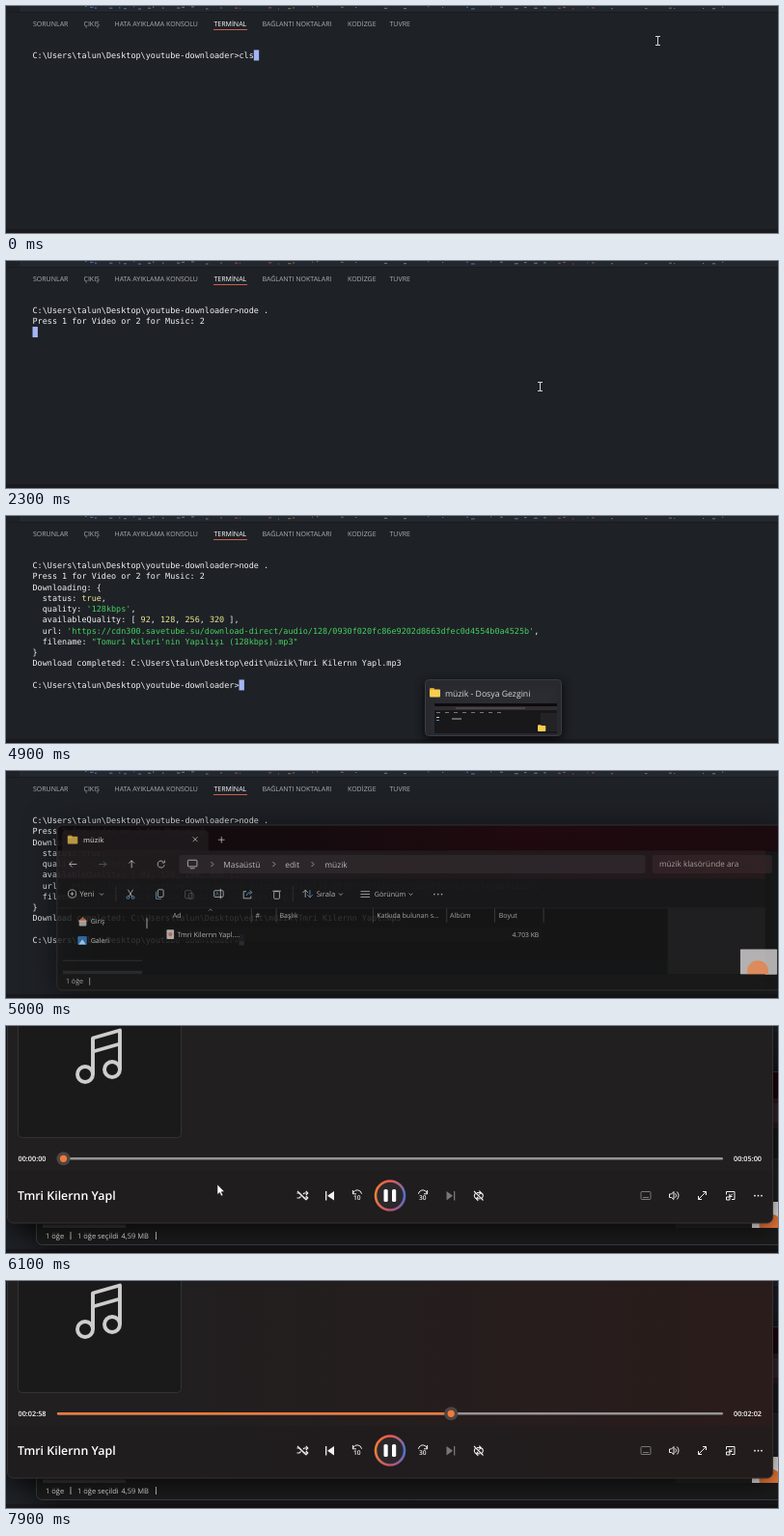
These frames come from a looping animation (800x235 px, 8 s). An HTML page with a canvas:

```html
<!DOCTYPE html>
<html lang="tr">
<head>
<meta charset="utf-8">
<title>Terminal</title>
<style>
html, body { margin: 0; width: 100%; height: 100%; overflow: hidden; background: #1e2126; }
canvas { display: block; width: 800px; height: 235px; }
</style>
</head>
<body>
<canvas id="stage" width="800" height="235"></canvas>
<script>
const ctx = document.getElementById('stage').getContext('2d');
const LOOP = 8000, STEP = 100;
const SANS = '"Open Sans", "Noto Sans", sans-serif';
const MONO = '"DejaVu Sans Mono", "Liberation Mono", monospace';
const COL = 5.095, ROW = 11.27, LEFT = 27.5;
const WHITE = '#f2f2f2', GREEN = '#45d060', YELLOW = '#f0e890', ORANGE = '#f07a3a';
const PROMPT = 'C:\\Users\\talun\\Desktop\\youtube-downloader>';
const SONG = 'Tmri Kilernn Yapl';

function box(x, y, w, h, fill, r = 0, stroke) {
  ctx.beginPath();
  ctx.roundRect(x, y, w, h, r);
  if (fill) { ctx.fillStyle = fill; ctx.fill(); }
  if (stroke) { ctx.strokeStyle = stroke; ctx.lineWidth = 1; ctx.stroke(); }
}

function line(color, w, ...p) {
  ctx.beginPath();
  for (let i = 0; i < p.length; i += 2) ctx.lineTo(p[i], p[i + 1]);
  ctx.strokeStyle = color;
  ctx.lineWidth = w;
  ctx.stroke();
}

function disc(x, y, r, fill, stroke, w = 1) {
  ctx.beginPath();
  ctx.arc(x, y, r, 0, 7);
  if (fill) { ctx.fillStyle = fill; ctx.fill(); }
  if (stroke) { ctx.strokeStyle = stroke; ctx.lineWidth = w; ctx.stroke(); }
}

function arc(x, y, r, a, b, color, w = 1) {
  ctx.beginPath();
  ctx.arc(x, y, r, a, b);
  ctx.strokeStyle = color;
  ctx.lineWidth = w;
  ctx.stroke();
}

function poly(fill, ...p) {
  ctx.beginPath();
  for (let i = 0; i < p.length; i += 2) ctx.lineTo(p[i], p[i + 1]);
  ctx.closePath();
  ctx.fillStyle = fill;
  ctx.fill();
}

// y is the middle of the capitals
function label(s, x, y, size, color = WHITE, weight = 500) {
  ctx.font = `${weight} ${size}px ${SANS}`;
  ctx.fillStyle = color;
  ctx.fillText(s, x, y + size * 0.36);
}

function fade(x0, x1, ...stops) {
  const g = ctx.createLinearGradient(x0, 0, x1, 0);
  stops.forEach((c, i) => g.addColorStop(i / (stops.length - 1), c));
  return g;
}

function shadowed(blur, draw) {
  ctx.shadowColor = 'rgba(0,0,0,.75)';
  ctx.shadowBlur = blur;
  ctx.shadowOffsetY = 3;
  draw();
  ctx.shadowColor = 'transparent';
  ctx.shadowBlur = ctx.shadowOffsetY = 0;
}

function random(seed) {
  return () => (seed = (seed * 16807) % 2147483647) / 2147483647;
}

// ---- editor panel ----
function panel() {
  box(0, 0, 800, 235, '#1e2126');
  box(14, 0, 786, 6, '#23272e');
  box(0, 6, 800, 1, '#191b20');
  const rnd = random(77), tints = ['#6b727e', '#4a6fa3', '#6b727e', '#85504c', '#7b664c'];
  for (let x = 82; x < 752; x += 5) {
    const tint = tints[Math.floor(x / 70) % 5], y = rnd() * 2.5;
    if (rnd() < 0.4) box(x, y, 1 + rnd() * 3, 1.1, tint);
  }
  box(0, 231, 800, 4, '#1a191d');
  const tabs = [['SORUNLAR', 28], ['ÇIKIŞ', 80.5], ['HATA AYIKLAMA KONSOLU', 112.5], ['TERMİNAL', 215.5],
    ['BAĞLANTI NOKTALARI', 265.5], ['KODİZGE', 354], ['TUVRE', 397.5]];
  tabs.forEach(([s, x], i) => label(s, x, 18.8, 7, i === 3 ? '#fff' : '#acaeb2'));
  box(215, 24, 35, 1, '#c8604f');
}

function put(row, ...parts) {
  ctx.font = `8.46px ${MONO}`;
  let col = 0;
  for (let i = 0; i < parts.length; i += 2) {
    ctx.fillStyle = parts[i + 1] || WHITE;
    for (const ch of parts[i]) ctx.fillText(ch, LEFT + COL * col++, 54 + ROW * row);
  }
  return col;
}

function caret(row, col) {
  box(LEFT + COL * col, 45.5 + ROW * row, 5.4, 11, '#a3b5f3');
}

function terminal(t) {
  const typed = t < 100 ? 'cls' : t < 200 ? '' : 'node .';
  const end = put(0, PROMPT + typed);
  if (t < 400) return caret(0, end);
  if (t < 600) return caret(1, 0);
  const ask = put(1, 'Press 1 for Video or 2 for Music: ' + (t < 1000 ? '' : '2'));
  if (t < 1100) return caret(1, ask);
  if (t < 2500) return caret(2, 0);
  put(2, 'Downloading: {');
  put(3, '  status: ', WHITE, 'true', YELLOW, ',', WHITE);
  put(4, '  quality: ', WHITE, "'128kbps'", GREEN, ',', WHITE);
  put(5, '  availableQuality: [ ', WHITE, '92', YELLOW, ', ', WHITE, '128', YELLOW, ', ', WHITE,
    '256', YELLOW, ', ', WHITE, '320', YELLOW, ' ],', WHITE);
  put(6, '  url: ', WHITE,
    "'https://cdn300.savetube.su/download-direct/audio/128/0930f020fc86e9202d8663dfec0d4554b0a4525b'", GREEN, ',', WHITE);
  put(7, '  filename: ', WHITE, '"Tomuri Kileri\'nin Yapılışı (128kbps).mp3"', GREEN);
  put(8, '}');
  if (t < 4200) return caret(9, 0);
  put(9, `Download completed: C:\\Users\\talun\\Desktop\\edit\\müzik\\${SONG}.mp3`);
  caret(11, put(11, PROMPT));
}

// ---- file explorer ----
function folder(x, y, s = 1) {
  box(x, y, 5 * s, 3 * s, '#d99a20', s);
  box(x, y + 1.4 * s, 11 * s, 8 * s, '#f8cd52', s);
}

function preview() {
  shadowed(10, () => box(434.5, 169.5, 141, 58, '#2b2c31', 4, '#3b3c42'));
  folder(439, 178);
  label('müzik - Dosya Gezgini', 455, 183.5, 8.7, '#d8d8d8', 400);
  box(444, 194, 127, 31, '#18181a');
  box(444, 194, 127, 3, '#0e0b0d');
  box(444, 197, 127, 4, '#302d31');
  box(466, 198, 72, 2, '#49464a');
  for (let i = 0; i < 8; i++) box(446 + i * 9, 203, 4, 1, '#77777a');
  box(446, 208, 3, 1, '#c4c4c4');
  box(446, 211, 3, 1, '#4d93d8');
  box(462, 209.5, 10, 1, '#b5b5b5');
  box(554, 204, 17, 19, '#232325');
  folder(551, 216, 0.75);
}

function chevron(x, y, right, color = '#cdcdcd') {
  if (right) line(color, 1, x - 1.3, y - 2.6, x + 1.3, y, x - 1.3, y + 2.6);
  else line(color, 1, x - 2, y - 1, x, y + 1, x + 2, y - 1);
}

function arrow(x, y, turn, color) {
  ctx.save();
  ctx.translate(x, y);
  ctx.rotate(turn);
  line(color, 1, 4, 0, -4, 0);
  line(color, 1, -1, -3, -4, 0, -1, 3);
  ctx.restore();
}

function toolbar() {
  const ink = '#d8d8d8', blue = '#6cb2e6', dim = '#5c5a5c';
  disc(48, 122, 4.3, null, ink);
  line(ink, 1, 46, 122, 50, 122);
  line(ink, 1, 48, 120, 48, 124);
  label('Yeni', 56, 122.5, 8.3);
  chevron(80, 122.5);
  box(95, 114, 1, 17, '#3a383a');
  line(ink, 1, 108.5, 117.5, 113, 125);
  line(ink, 1, 114, 117.5, 109.5, 125);
  disc(108.6, 126, 1.5, null, blue);
  disc(114, 126, 1.5, null, blue);
  box(141, 117.5, 6, 8, null, 1, ink);
  line(blue, 1, 139, 119.5, 139, 127.5, 145, 127.5);
  box(170.5, 118.5, 7, 8.5, null, 1, dim);
  box(174.5, 121.5, 5, 6, null, 1, dim);
  box(202, 118.5, 10, 7, null, 1, ink);
  label('A', 203.5, 122, 6, blue);
  line(ink, 1, 209, 116.5, 209, 127.5);
  line(ink, 1, 237, 119.5, 234, 119.5, 234, 127, 242, 127, 242, 124.5);
  line(blue, 1, 237, 124, 239, 121, 243, 120.5);
  line(blue, 1, 240.5, 118, 243, 120.5, 240.5, 123);
  line(ink, 1, 265.5, 119, 274.5, 119);
  box(267, 119.5, 6, 8, null, 1, ink);
  box(287, 114, 1, 17, '#3a383a');
  arrow(301, 122, Math.PI / 2, ink);
  arrow(306, 122, -Math.PI / 2, blue);
  label('Sırala', 313, 122.5, 8);
  chevron(339.5, 122.5);
  for (const y of [119.5, 122.5, 125.5]) line(ink, 1, 361, y, 371, y);
  label('Görünüm', 376, 122.5, 7.5);
  chevron(415.5, 122.5);
  for (const x of [441, 445, 449]) disc(x, 122.5, 0.9, ink);
}

function explorer(selected) {
  shadowed(34, () => box(31.5, 47.5, 790, 179, '#191919', 6));
  box(32, 48, 790, 28, fade(32, 800, '#0e0709', '#13060a', '#23040b', '#1c040a'), [6, 6, 0, 0]);
  box(37, 53, 159, 24, '#231e21', [5, 5, 0, 0]);
  box(32, 75, 768, 31, fade(32, 800, '#231e21', '#241c1f', '#2c1b1f'));
  box(32, 106, 768, 31, '#1a191a');
  folder(43, 58.5);
  label('müzik', 60, 63.5, 7.7, WHITE, 600);
  line('#d8d8d8', 1, 179, 60.5, 184, 65.5);
  line('#d8d8d8', 1, 184, 60.5, 179, 65.5);
  line('#d8d8d8', 1, 206.5, 63.5, 213.5, 63.5);
  line('#d8d8d8', 1, 210, 60, 210, 67);
  arrow(49, 90, 0, '#e4e4e4');
  arrow(81, 90, Math.PI, '#6c686a');
  arrow(112.5, 90, Math.PI / 2, '#e4e4e4');
  arc(144.5, 90, 3.6, 0.2, 5.4, '#e4e4e4');
  line('#e4e4e4', 1, 148.3, 85.8, 148.3, 88.4, 145.6, 88.4);
  box(164, 80, 506, 20, '#322c2f', 3);
  box(677.5, 80, 130, 20, '#35262a', 3);
  box(173.5, 85.5, 10, 7, null, 1, '#e4e4e4');
  line('#e4e4e4', 1, 176, 94.5, 181, 94.5);
  chevron(200, 90, true);
  label('Masaüstü', 212, 90, 8.8);
  chevron(267, 90, true);
  label('edit', 279, 90, 8.8);
  chevron(309, 90, true);
  label('müzik', 322, 90, 8.8);
  label('müzik klasöründe ara', 685, 90, 8.6, '#d6d0d2', 400);
  toolbar();

  box(32, 137, 768, 1, '#2e2d2e');
  poly('#e8794a', 54, 152, 59.5, 147, 65, 152);
  box(55.5, 151, 8, 6, '#d9d4d0', 1);
  label('Giriş', 68, 152.2, 7.3);
  box(54, 168, 10, 9.5, '#3b86d6', 1.5);
  poly('#cfe6fa', 55, 177, 59, 171.5, 63, 177);
  label('Galeri', 68, 173.2, 7.3);
  box(38, 194, 86, 1, '#3a3a3a');
  box(38, 205.5, 86, 3.5, '#333');
  box(128.3, 148, 1.6, 12, '#9a9a9a', 1);

  const heads = [['Ad', 157], ['#', 247], ['Başlık', 273], ['Katkıda bulunan s...', 378.5], ['Albüm', 458], ['Boyut', 511]];
  heads.forEach(([s, x]) => label(s, x, 145.7, 7.4, '#e0e0e0'));
  for (const x of [242, 269, 374, 454, 506, 559]) box(x, 138, 1, 15, '#4a4a4a');
  line('#999', 1, 196, 140.5, 198, 138.5, 200, 140.5);
  box(147.5, 158.5, 410.5, 15, selected ? '#4c4d50' : '#191919', 1, selected ? '#b4b6b9' : null);
  box(150.5, 161, 8, 10, '#eee8e2', 1);
  disc(154.5, 166, 2.2, '#a8583c');
  label('Tmri Kilernn Yapl....', 162, 166, 7.6);
  label('4.703 KB', 525.5, 166, 7.1);

  box(694, 138, 106, 71, '#242324');
  box(773, 182, 40, 27.5, '#f2f0ee', 1);
  ctx.save();
  ctx.beginPath();
  ctx.rect(773, 182, 40, 27.5);
  ctx.clip();
  disc(792, 206, 11.5, ORANGE);
  ctx.restore();
  box(32, 209, 768, 17, '#1b1a1b', [0, 0, 0, 6]);
  label('1 öğe', 41, 217, 7.5, '#e0e0e0');
  box(66.5, 213, 1, 8, '#bbb');
  if (selected) {
    label('1 öğe seçildi', 74, 217, 7.5, '#e0e0e0');
    label('4,59 MB', 119.5, 217, 7.5, '#e0e0e0');
    box(155, 213, 1, 8, '#bbb');
  }
  box(31.5, 47.5, 790, 179, null, 6, '#3d3a3c');
}

// ---- media player ----
function note() {
  const ink = '#cdcdcd';
  disc(82, 50, 8, null, ink, 3.9);
  disc(110, 45, 8, null, ink, 3.9);
  ctx.lineJoin = 'round';
  line(ink, 3.9, 90, 50, 90, 12.5, 118, 4.5, 118, 45);
  line(ink, 3.6, 90, 26.5, 118, 18.5);
  ctx.lineJoin = 'miter';
}

function skip(x, dir, text, ink) {
  arc(x, 174.5, 4.6, Math.PI * 1.05, Math.PI * 1.95, ink);
  const e = x + dir * 4.6;
  line(ink, 1, e, 170, e, 173.8, e - dir * 3.6, 173.8);
  label(text, x - 4, 178, 6.6, ink, 600);
}

function controls() {
  const ink = '#f0f0f0', dim = '#777';
  line(ink, 1.1, 301.5, 173, 304, 173, 309, 178, 312.5, 178);
  line(ink, 1.1, 301.5, 178, 304, 178, 305.5, 176.5);
  line(ink, 1.1, 308, 174, 309, 173, 312.5, 173);
  line(ink, 1.1, 310.8, 171, 312.8, 173, 310.8, 175);
  line(ink, 1.1, 310.8, 176, 312.8, 178, 310.8, 180);
  line(ink, 1.1, 302, 171, 311, 180);
  box(331, 171, 1.3, 9.5, ink);
  poly(ink, 340, 171, 340, 180.5, 333, 175.7);
  skip(364, -1, '10', ink);
  skip(432, 1, '30', ink);
  poly(dim, 456.5, 171, 456.5, 180.5, 463, 175.7);
  box(464, 171, 1.3, 9.5, dim);
  arc(488.3, 175.7, 3, 1.6, 4.1, ink, 1.1);
  arc(491.3, 175.7, 3, -1.6, 1, ink, 1.1);
  line(ink, 1.1, 488, 172.6, 492, 172.6);
  line(ink, 1.1, 487.5, 178.8, 491.5, 178.8);
  line(ink, 1.1, 490.3, 170.6, 492.3, 172.6, 490.3, 174.6);
  line(ink, 1.1, 489.3, 176.8, 487.3, 178.8, 489.3, 180.8);
  line(ink, 1.1, 485, 171, 494.5, 180.5);

  const ring = ctx.createConicGradient(Math.PI, 398, 175.5);
  ['#f08232', '#ee5a4a', '#4a72d8', '#c0506e', '#f08232'].forEach((c, i) => ring.addColorStop(i / 4, c));
  disc(398, 175.5, 15, '#2b282b', ring, 2.6);
  box(391.5, 169, 4.2, 13, '#fff', 1.6);
  box(400, 169, 4.2, 13, '#fff', 1.6);

  box(658, 171.5, 10, 8, null, 1, dim);
  line(dim, 1, 660, 177.5, 666, 177.5);
  line(ink, 1, 687.5, 174, 689.5, 174, 692, 171.5, 692, 179.5, 689.5, 177.5, 687.5, 177.5, 687.5, 174);
  arc(691.5, 175.5, 3, -0.8, 0.8, ink);
  arc(691.5, 175.5, 5.5, -0.8, 0.8, ink);
  line(ink, 1, 717.5, 179.5, 725.5, 171.5);
  line(ink, 1, 722, 171.5, 725.5, 171.5, 725.5, 175);
  line(ink, 1, 717.5, 176, 717.5, 179.5, 721, 179.5);
  line(ink, 1, 746.5, 174.5, 746.5, 171.5, 755, 171.5, 755, 179.5, 752, 179.5);
  box(746.5, 177, 3.5, 3, null, 0, ink);
  line(ink, 1, 753, 173.5, 749.5, 177);
  line(ink, 1, 749.8, 173.8, 749.8, 176.5, 752.6, 176.5);
  for (const x of [776, 779.5, 783]) disc(x, 175.7, 0.9, ink);
}

function clock(s) {
  return '00:' + [Math.floor(s / 60), s % 60].map(n => String(n).padStart(2, '0')).join(':');
}

function player(t) {
  shadowed(24, () => box(1.5, -30, 793, 234, '#211f20', 6));
  const warm = Math.min(1, Math.max(0, (t - 6900) / 800));
  if (warm) box(1.5, -30, 793, 234, fade(150, 795, 'rgba(42,28,26,0)', `rgba(42,28,26,${warm})`), 6);
  box(1.5, 150, 793, 54, 'rgba(30,28,30,.55)', [0, 0, 6, 6]);
  box(1.5, -30, 793, 234, null, 6, '#343233');
  box(12.5, -20, 169, 135.5, '#1b1a1b', 4, '#343233');
  note();

  const total = 300, at = t < 7200 ? 0 : t < 7800 ? 177 : 178;
  const x = 59.5 + 677 * at / total;
  box(53, 136, 690, 2.6, '#989496', 1.3);
  if (at) box(53, 136, x - 53, 2.6, ORANGE, 1.3);
  disc(x, 137.3, 7, '#4d4543');
  disc(x, 137.3, 3.6, ORANGE);
  if (t >= 5900) {
    label(clock(at), 12.5, 137.8, 7.3, '#fff', 600);
    label(clock(total - at), 754, 137.8, 7.3, '#fff', 600);
    label(SONG, 12, 175.5, 12.4, '#fff', 600);
  }
  controls();
}

// ---- pointer ----
const path = [[0, 675, 36], [1200, 675, 36], [1500, 558, 130], [1600, 558, 130], [1700, 553, 130], [2400, 553, 130],
  [2800, 506, 245], [3800, 506, 245], [3900, 506, 233], [4000, 506, 245], [5000, 505, 240], [5300, 219, 164],
  [6300, 219, 164], [6800, 265, 149.5], [7200, 461, 137], [7400, 461, 137], [7700, 810, 150], [8000, 810, 150]];

function pointer(t) {
  const i = path.findIndex(p => p[0] > t), [t0, x0, y0] = path[i - 1], [t1, x1, y1] = path[i];
  const k = (t - t0) / (t1 - t0), x = x0 + (x1 - x0) * k, y = y0 + (y1 - y0) * k;
  if (t < 5000) {
    const ink = '#d2d4d6';
    line(ink, 1, x + 0.5, y - 4.5, x + 0.5, y + 4.5);
    line(ink, 1, x - 2, y - 4.5, x + 3, y - 4.5);
    line(ink, 1, x - 2, y + 4.5, x + 3, y + 4.5);
  } else {
    const p = [0, 0, 0, 10.5, 2.4, 8.4, 4, 12, 5.8, 11.2, 4.2, 7.7, 7.4, 7.4].map((v, n) => v + (n % 2 ? y : x));
    poly('#fff', ...p);
    line('#222', 0.6, ...p, p[0], p[1]);
  }
}

function draw(t) {
  panel();
  terminal(t);
  if (t >= 4500 && t < 5000) preview();
  if (t >= 5000) {
    const k = Math.min(1, 0.7 + (t - 5000) / 300);
    ctx.save();
    ctx.globalAlpha = k;
    ctx.translate(505 * (1 - k) * 0.15, 235 * (1 - k) * 0.15);
    ctx.scale(0.85 + k * 0.15, 0.85 + k * 0.15);
    explorer(t >= 5300);
    ctx.restore();
  }
  if (t >= 5600) player(t);
  pointer(t);
}

ctx.textRendering = 'geometricPrecision';
const start = performance.now();
function tick() {
  const t = (performance.now() - start) % LOOP;
  draw(Math.floor(t / STEP) * STEP);
  requestAnimationFrame(tick);
}
tick();
</script>
</body>
</html>
```
